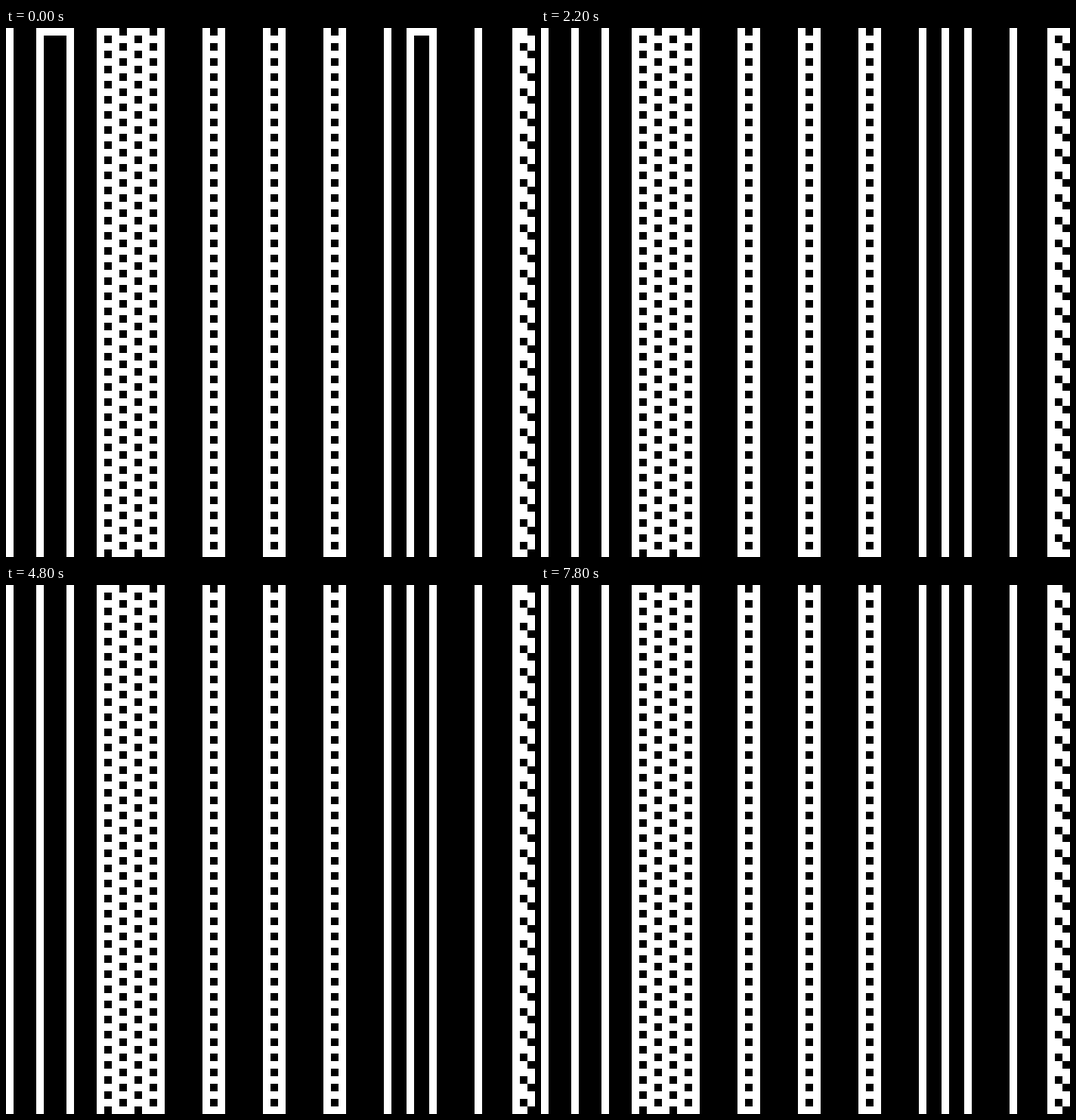
These frames come from a looping animation (700x700 px, 8 s). An HTML page:

```html
<!DOCTYPE html>
<html lang="en">
<head>
<meta charset="utf-8">
<title>Cell stripes</title>
<style>
  html, body { margin: 0; width: 100%; height: 100%; overflow: hidden; background: #000; }
  svg { display: block; width: 100vw; height: 100vh; shape-rendering: crispEdges; }
  path { fill: none; stroke: #fff; stroke-width: 1; }
  .wide { stroke-width: 3; }
  .dots { stroke: #000; stroke-dasharray: 1 1; }
  .sparse { stroke-dasharray: 1 2; }
  /* Two rows per tick, 40 ticks per loop */
  .scroll { animation: scroll 8s steps(40) infinite; }
  @keyframes scroll {
    from { transform: translateY(0); }
    to { transform: translateY(-80px); }
  }
</style>
</head>
<body>
<!-- One unit is one cell -->
<svg viewBox="0 0 70 70">
  <path d="M.5 0v70M4.5 0v70M8.5 0v70M50.5 0v70M53.5 0v70M56.5 0v70M62.5 0v70"/>
  <path class="wide" d="M13.5 0v70M16.5 0v70M19.5 0v70M27.5 0v70M35.5 0v70M43.5 0v70M68.5 0v70"/>
  <path class="dots" d="M13.5 1v69M17.5 1v69M15.5 0v70M19.5 0v70M27.5 0v70M35.5 0v70M43.5 0v70"/>
  <g class="scroll">
    <path d="M5 .5h3M54 .5h2"/>
    <path class="dots sparse" d="M68.5 2v150M69.5 0v150"/>
  </g>
</svg>
</body>
</html>
```
